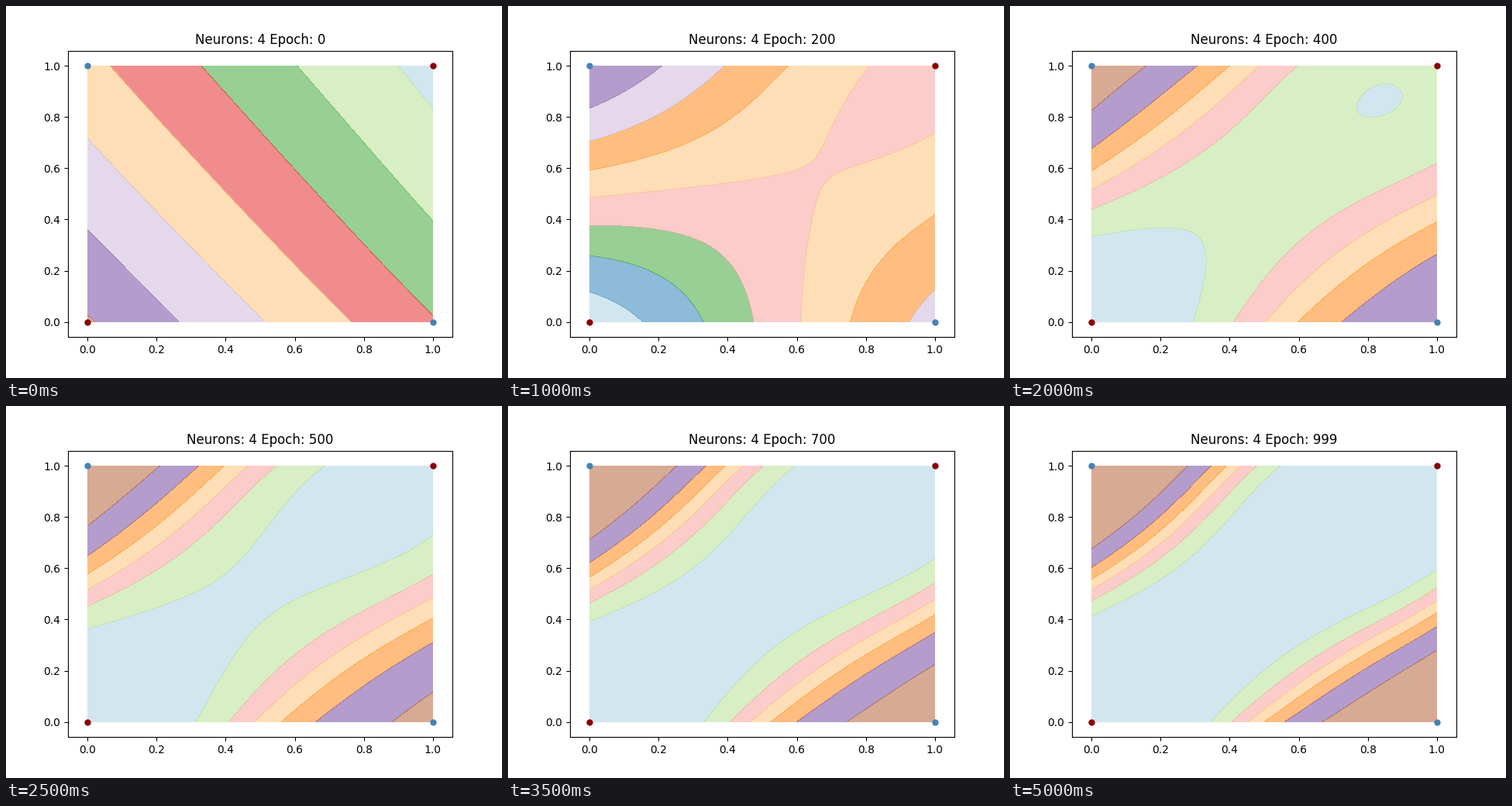
Recreate the animation shown at these times as a matplotlib script. Size 640 by 480 pixels, loop 5500 ms.

```python
import numpy as np
import matplotlib.pyplot as plt
from matplotlib.animation import FuncAnimation

plt.rcParams["text.kerning_factor"] = 6

EPOCHS = [*range(0, 1000, 100), 999]
PAIRED = plt.get_cmap("Paired")

# Lowest level, level step and palette entries of the filled contours.
NINE = [0, 2, 3, 4, 6, 7, 8, 9, 11]
SCALES = {0: (.36, .02, [0, 2, 3, 5, 6, 8, 9, 11]),
          100: (.32, .04, NINE),
          200: (.16, .08, [0, 1] + NINE[2:]),
          300: (.1, .1, NINE)}
LATE_SCALE = (0, .15, [0, 2, 4, 6, 7, 9, 11])

# Key logits of the network output on a coarse grid, y upwards by row.
LOGITS = {
    0: [[.007, -.156, -.3165],
        [-.112, -.271, -.427],
        [-.2205, -.374, -.5175]],
    100: [[-.686, -.258, .165, .577],
          [-.293, .038, .351, .602],
          [.08, .289, .456, .578],
          [.405, .49, .521, .502]],
    200: [[-1.46, -.746, .045, .7],
          [-.535, -.37, -.045, .34],
          [.463, .135, -.08, -.02],
          [1.38, .69, .1, -.21]],
    400: [[-4.1, -1.43, .8, 2],
          [-1.73, -1.69, -.66, .73],
          [1.02, -.88, -1.55, -1.05],
          [3.24, .89, -1.18, -1.3]],
    999: [[-7.9, -1.91, 2.19, 4],
          [-2.95, -3.4, -1.53, 1.58],
          [2.05, -2, -4, -2.55],
          [6.9, 1.31, -3, -4]],
}

axis = np.linspace(0, 1, 201)


def surface(nodes):
    """Polynomial surface through evenly spaced nodes on the unit square."""
    nodes = np.array(nodes)
    n = len(nodes)
    basis = np.vander(axis, n) @ np.linalg.inv(np.vander(np.linspace(0, 1, n)))
    return basis @ nodes @ basis.T


fields = {epoch: surface(nodes) for epoch, nodes in LOGITS.items()}


def output(epoch):
    """Sigmoid of the logits, which drift with the logarithm of the epoch."""
    if epoch in fields:
        logit = fields[epoch]
    else:
        a = max(k for k in fields if k < epoch)
        b = min(k for k in fields if k > epoch)
        w = np.log(epoch / a) / np.log(b / a)
        logit = (1 - w) * fields[a] + w * fields[b]
    return 1 / (1 + np.exp(-logit))


fig, ax = plt.subplots(figsize=(6.4, 4.8), dpi=100)


def draw(i):
    epoch = EPOCHS[i]
    low, step, picks = SCALES.get(epoch, LATE_SCALE)
    levels = low + step * np.arange(len(picks) + 1)
    z = np.clip(output(epoch), levels[0] + 1e-6, levels[-1] - 1e-6)
    ax.clear()
    ax.contourf(axis, axis, z, levels=levels, alpha=.5,
                colors=[PAIRED(k) for k in picks])
    ax.scatter([0, 1], [0, 1], color="darkred", linewidths=0)
    ax.scatter([0, 1], [1, 0], color="steelblue", linewidths=0)
    ax.set_xlim(-.0566, 1.0566)
    ax.set_ylim(-.059, 1.059)
    ax.set_title(f"Neurons: 4 Epoch: {epoch}")
    return []


anim = FuncAnimation(fig, draw, frames=len(EPOCHS), interval=500,
                     repeat=True, repeat_delay=0, blit=False)
plt.show()
```
